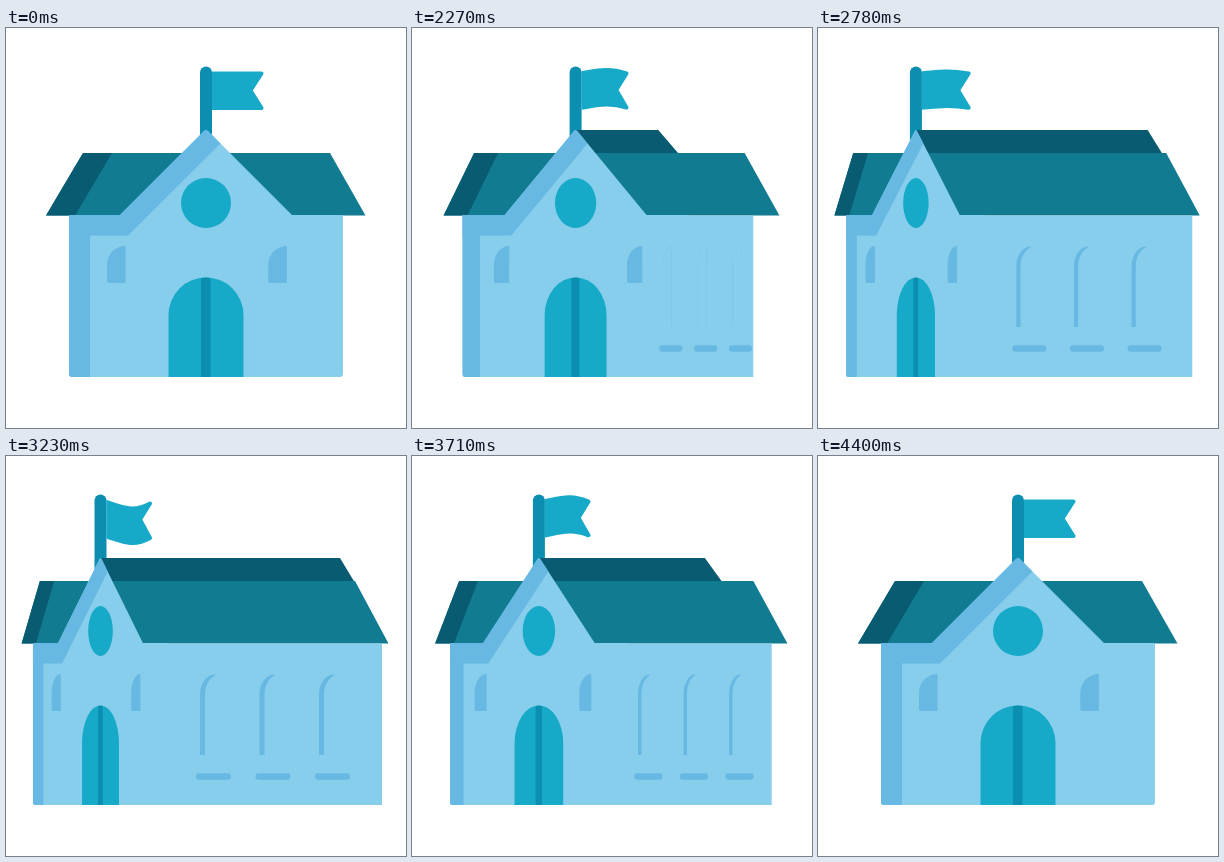
An HTML page with a canvas that plays this animation: 400 px wide and 400 px high, repeating every 4430 ms.

```html
<!DOCTYPE html>
<html lang="en">
<head>
<meta charset="utf-8">
<title>School building</title>
<style>
html, body { margin: 0; width: 100%; height: 100%; overflow: hidden; background: #fff; }
canvas { display: block; width: 400px; height: 400px; }
</style>
</head>
<body>
<canvas id="stage" width="400" height="400"></canvas>
<script>
const ctx = document.getElementById('stage').getContext('2d');
const LOOP = 4430, HOLD = 2030, STEP = 30;
const COLOR = {
  wall: '#86ceec', shade: '#67b8e2', roof: '#117b91',
  dark: '#085b71', aqua: '#16a9c8', deep: '#0c8eb1'
};

const clamp = v => Math.min(1, Math.max(0, v));
const cubicInOut = u => u < 0.5 ? 4 * u ** 3 : 1 - 4 * (1 - u) ** 3;

// Bezier easing with horizontal tangents at both ends.
function bezierEase(u, x1, x2) {
  let lo = 0, hi = 1;
  for (let i = 0; i < 24; i++) {
    const m = (lo + hi) / 2, n = 1 - m;
    if (3 * m * n * n * x1 + 3 * m * m * n * x2 + m ** 3 < u) lo = m; else hi = m;
  }
  return lo * lo * (3 - 2 * lo);
}

function turnAt(t) {
  if (t < HOLD) return 0;
  if (t < 3200) return bezierEase(clamp((t - 2000) / 1000), 0.33, 0.23);
  return 1 - cubicInOut(clamp((t - 3200) / 1200));
}

function waveAt(t) {
  return t < 2150 || t > 4250 ? 0 : -Math.cos((t - 3200) / 1400 * 2 * Math.PI);
}

function poly(color, ...points) {
  ctx.fillStyle = color;
  ctx.beginPath();
  points.forEach(([x, y]) => ctx.lineTo(x, y));
  ctx.closePath();
  ctx.fill();
}

function roundRect(color, x, y, w, h, radii) {
  ctx.fillStyle = color;
  ctx.beginPath();
  ctx.roundRect(x, y, w, h, radii);
  ctx.fill();
}

function drawFlag(cx, wave) {
  roundRect(COLOR.deep, cx - 6, 38.5, 12, 75, [6, 6, 0, 0]);
  const amount = Math.min(1, Math.abs(wave) * 1.5);
  const length = 49.5 - 6 * amount;
  const top = 45.5, bottom = 80, tipDrop = wave < 0 ? -2 * wave : 0;
  ctx.save();
  ctx.translate(cx + 6, 0);
  ctx.beginPath();
  ctx.rect(0, 0, 80, 120);
  ctx.clip();
  ctx.beginPath();
  ctx.moveTo(-2, top);
  ctx.bezierCurveTo(15, top - 5 * wave, 26, top - 12 * wave, length, top + tipDrop);
  ctx.lineTo(length - 11 + amount, 62.5 - wave);
  ctx.lineTo(length, bottom + tipDrop - Math.max(0, wave));
  ctx.bezierCurveTo(26, bottom - 12 * wave, 15, bottom - 5 * wave, -2, bottom);
  ctx.closePath();
  ctx.fillStyle = ctx.strokeStyle = COLOR.aqua;
  ctx.lineWidth = 4;
  ctx.lineJoin = 'round';
  ctx.fill();
  ctx.stroke();
  ctx.restore();
}

function drawRoof(p, cx, s) {
  if (p > 0) {
    poly(COLOR.dark, [cx, 102], [200 + 134 * p, 102], [224 + 124.5 * p, 126], [cx, 126]);
  }
  poly(COLOR.roof, [cx - 123 * s, 125], [324 + 25 * p, 125],
    [359.5 + 23 * p, 187.5], [cx - 160 * s, 187.5]);
  poly(COLOR.dark, [cx - 123 * s, 125], [cx - 94 * s, 125],
    [cx - 131 * s, 187.5], [cx - 160 * s, 187.5]);
}

function smallWindow(x) {
  roundRect(COLOR.shade, x, 218, 18.5, 37, [18.5, 0, 0, 2]);
}

function drawFacade(cx, s) {
  ctx.save();
  ctx.translate(cx, 0);
  ctx.scale(s, 1);
  ctx.translate(-200, 0);
  roundRect(COLOR.wall, 63, 187, 274, 162, [0, 0, 3, 3]);
  poly(COLOR.wall, [198, 103], [200, 102], [202, 103], [287, 188], [113, 188]);
  roundRect(COLOR.shade, 63, 187, 21, 162, [0, 0, 0, 3]);
  poly(COLOR.shade, [200, 102], [202, 103], [214.5, 115.5], [122, 207.5],
    [63, 207.5], [63, 187], [114, 187], [198, 103]);
  ctx.fillStyle = COLOR.aqua;
  ctx.beginPath();
  ctx.arc(200, 175, 25, 0, 2 * Math.PI);
  ctx.fill();
  smallWindow(101);
  smallWindow(262.3);
  const door = [162.5, 249.5, 75, 99.5, [37.5, 37.5, 0, 0]];
  roundRect(COLOR.aqua, ...door);
  ctx.clip();
  ctx.fillStyle = COLOR.deep;
  ctx.fillRect(195, 249, 9.5, 100);
  ctx.restore();
}

function sideWindow(x, q, thick) {
  const arch = (left, color) => {
    const right = left + 15 * q;
    ctx.fillStyle = color;
    ctx.beginPath();
    ctx.moveTo(left, 299);
    ctx.lineTo(left, 238);
    ctx.ellipse(right, 238, 15 * q, 19.5, 0, Math.PI, 1.5 * Math.PI);
    ctx.lineTo(right, 299);
    ctx.fill();
  };
  const left = x - 13.5 * q;
  ctx.save();
  ctx.beginPath();
  ctx.rect(left - 1, 210, 15 * q + thick + 1, 90);
  ctx.clip();
  arch(left, COLOR.shade);
  arch(left + thick, COLOR.wall);
  ctx.restore();
}

function drawSide(p, opening) {
  if (p < 0.001) return;
  const q = p + 2 * p * (1 - p) ** 2.5;
  const thick = 5 * (opening ? p ** 5 : p);
  ctx.strokeStyle = COLOR.shade;
  ctx.lineWidth = 6.5;
  ctx.lineCap = 'round';
  for (let i = 0; i < 3; i++) {
    const x = 329.5 - 3 * p - 59.5 * q * i;
    if (p > 0.02) sideWindow(x, q, thick);
    ctx.beginPath();
    ctx.moveTo(x - 14.25 * q, 320.5);
    ctx.lineTo(x + 14.25 * q, 320.5);
    ctx.stroke();
  }
}

function draw(t) {
  const p = turnAt(t), cx = 200 - 105.5 * p, s = 1 - 0.507 * p;
  ctx.fillStyle = '#fff';
  ctx.fillRect(0, 0, 400, 400);
  drawFlag(cx, waveAt(t));
  drawRoof(p, cx, s);
  if (p > 0) {
    ctx.fillStyle = COLOR.wall;
    ctx.fillRect(cx, 187.5, 323 + 53 * p - cx, 161.5);
  }
  drawFacade(cx, s);
  drawSide(p, t < 3200);
}

const start = performance.now();
function frame() {
  const t = (performance.now() - start) % LOOP;
  draw(t < HOLD ? 0 : HOLD + Math.floor((t - HOLD) / STEP) * STEP);
  requestAnimationFrame(frame);
}
frame();
</script>
</body>
</html>
```
